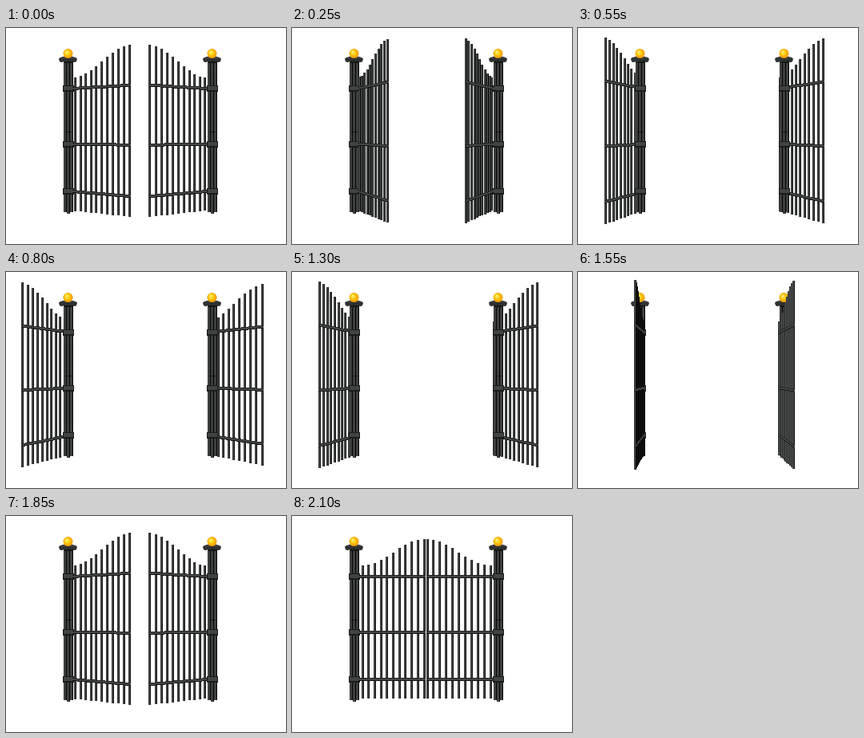
These frames come from a looping animation (350 by 271 pixels, 2600 ms). An HTML page with a canvas:

```html
<!DOCTYPE html>
<html lang="en">
<head>
<meta charset="utf-8">
<title>Gate</title>
<style>
html, body { margin: 0; width: 100%; height: 100%; overflow: hidden; background: #fff; }
canvas { display: block; width: 350px; height: 271px; }
</style>
</head>
<body>
<canvas id="stage" width="350" height="271"></canvas>
<script>
const ctx = document.getElementById('stage').getContext('2d');
const LOOP = 2600, VX = 167, VY = 129, DIST = 530, BARS = 11;

// [start ms, left angle, right angle]
const steps = [
  [0, 28, 28.6], [250, 58, 60.4], [400, 87, 92], [550, 110, 116],
  [800, 120, 128], [1300, 110, 116], [1550, 87, 92], [1700, 58, 60.4],
  [1850, 28, 28.6], [2100, 0, 0]
];
const leaves = [
  { hinge: -85, dir: 1, first: 6, last: 83, post: 77.5 },
  { hinge: 84, dir: -1, first: 3, last: 82, post: 257.5 }
];
const rails = [76, 145.5, 205];

function rect(color, x, y, w, h) {
  ctx.fillStyle = color;
  ctx.fillRect(Math.round(x), Math.round(y), w, Math.round(h));
}

function disc(color, x, y, rx, ry = rx) {
  ctx.fillStyle = color;
  ctx.beginPath();
  ctx.ellipse(x, y, rx, ry, 0, 0, Math.PI * 2);
  ctx.fill();
}

// Upright rod, lit from the left
function rod(x, top, bottom) {
  const h = Math.round(bottom) - Math.round(top);
  x = Math.round(x - 1.5);
  rect('#353737', x, top, 1, h);
  rect('#4a4c4c', x + 1, top, 1, h);
  rect('#0c0c0c', x + 2, top, 1, h);
}

function project(leaf, r, angle) {
  const a = angle * Math.PI / 180;
  const s = DIST / (DIST - r * Math.sin(a));
  return {
    s,
    x: VX + (leaf.hinge + leaf.dir * r * Math.cos(a)) * s,
    y: v => VY + (v - VY) * s
  };
}

function drawLeaf(leaf, angle) {
  for (let i = 0; i < BARS; i++) {
    const k = i / (BARS - 1);
    const p = project(leaf, leaf.first + (leaf.last - leaf.first) * k, angle);
    rod(p.x, p.y(62 - 16.5 * (1 - Math.cos(Math.PI * k))), p.y(229));
  }
  const a = project(leaf, 1, angle), b = project(leaf, leaf.last + 1, angle);
  const [l, r] = a.x < b.x ? [a, b] : [b, a];
  const x0 = Math.round(l.x), x1 = Math.round(r.x);
  for (const v of rails) {
    for (let x = x0; x <= x1; x++) {
      const k = (x - x0) / Math.max(1, x1 - x0);
      const y = Math.round(l.y(v) + (r.y(v) - l.y(v)) * k);
      rect('#242525', x, y - 2, 1, 1);
      rect('#434545', x, y - 1, 1, 2);
      rect('#151515', x, y + 1, 1, 1);
    }
  }
}

function drawPost(c) {
  rect('#1c1d1d', c - 5.5, 42, 11, 188);
  [[-4, 231], [4, 231], [0, 233]].forEach(([dx, bottom]) => {
    rect('#343636', c + dx - 2, 41, 3, bottom - 41);
    rect('#484a4a', c + dx - 1, 41, 1, bottom - 41);
    rect('#0c0c0c', c + dx + 1, 41, 1, bottom - 41);
  });
  rect('#111', c - 4, 130, 8, 1);
  for (const v of rails) {
    rect('#1a1b1b', c - 7, v - 4, 14, 8);
    rect('#414343', c - 6, v - 3, 12, 5);
  }
  // Cap
  disc('#222424', c, 39, 11.5, 3.5);
  [-8, -3, 3, 8].forEach(dx => disc('#2f3131', c + dx, 40, 3, 3));
  rect('#444646', c - 9, 37, 18, 1);
  rect('#151616', c - 5, 42, 10, 2);
  // Ball
  const g = ctx.createRadialGradient(c - 2, 30, 0.5, c, 32, 6.5);
  g.addColorStop(0, '#fff07a');
  g.addColorStop(0.45, '#ffc80c');
  g.addColorStop(1, '#f09000');
  disc(g, c, 32, 6);
}

function draw(left, right) {
  ctx.clearRect(0, 0, 350, 271);
  leaves.forEach((leaf, i) => {
    const angle = i ? right : left;
    const behind = angle > 100;
    if (behind) drawLeaf(leaf, angle);
    drawPost(leaf.post);
    if (!behind) drawLeaf(leaf, angle);
  });
}

const start = performance.now();
let shown = null;

function tick() {
  const t = (performance.now() - start) % LOOP;
  const step = steps.filter(s => s[0] <= t).pop();
  if (step !== shown) {
    shown = step;
    draw(step[1], step[2]);
  }
  requestAnimationFrame(tick);
}
tick();
</script>
</body>
</html>
```
